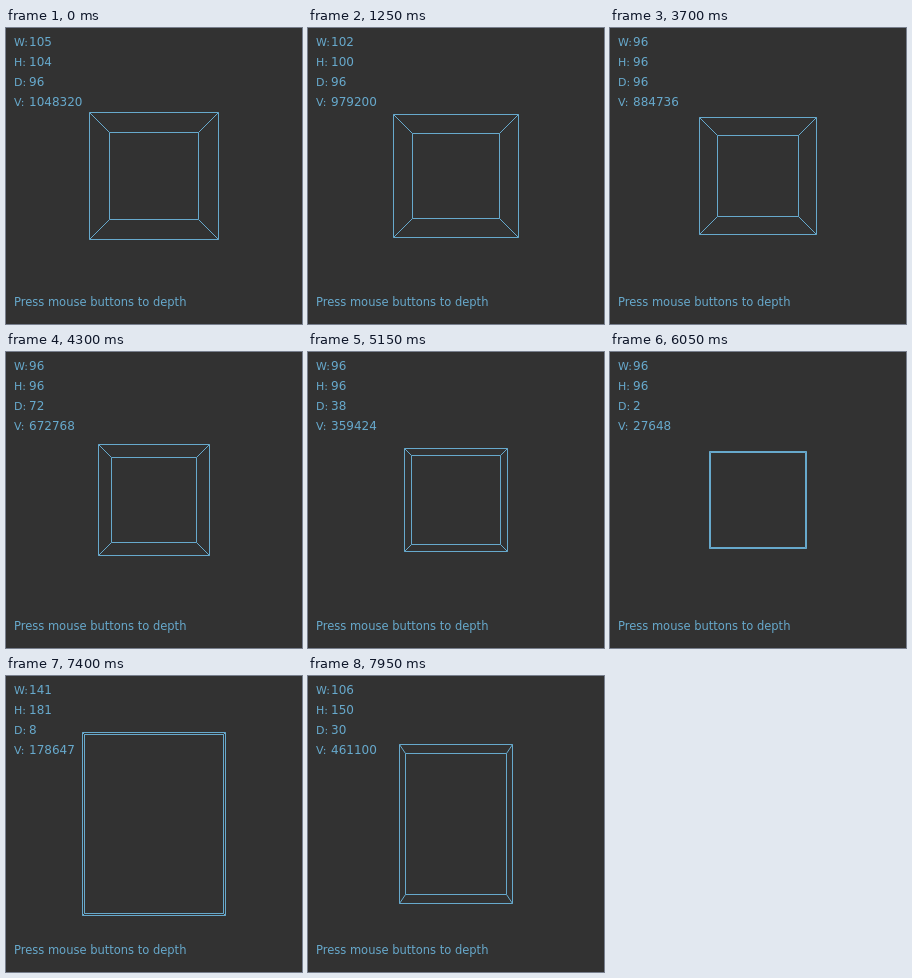
An HTML page with a canvas for the animation above (8 s loop, 296 px wide and 296 px high).

```html
<!DOCTYPE html>
<html lang="en">
<head>
<meta charset="utf-8">
<style>
html, body { margin: 0; width: 100%; height: 100%; overflow: hidden; background: #323232; }
canvas { display: block; }
</style>
</head>
<body>
<canvas id="stage" width="296" height="296"></canvas>
<script>
const ctx = document.getElementById('stage').getContext('2d');
const SIZE = 296, MID = SIZE / 2, LOOP = 8000, STEP = 50;
const EYE = 260;
const FONT = '"DejaVu Sans", sans-serif';

const clamp = (v, lo, hi) => Math.max(lo, Math.min(hi, v));
const ramp = (t, from, to) => clamp((t - from) / (to - from), 0, 1);
const pullBack = u => u * u * (3.5 * u - 2.5);

// The pointer trims the box to a cube, flings it wide, then swings round to a tall shape
function boxSize(t) {
  const trim = ramp(t, 850, 1750), settle = ramp(t, 2400, 2900);
  const fling = pullBack(ramp(t, 6200, 6900)), swing = ramp(t, 6900, 7700);
  const w = 105 - 7 * trim - 2 * settle + 104 * fling - 94 * swing;
  const h = 104 - 8 * trim + 49 * fling + 5 * swing + 36 * Math.sin(Math.PI * swing);
  return [Math.round(w), Math.round(h)];
}

// Depth changes by one every 25 ms while a button is held
function depthAt(t) {
  const d = t < 7200 ? 96 - (t - 3700) / 25 : (t - 7200) / 25;
  return clamp(Math.round(d), 0, 96);
}

function corners(w, h, z) {
  const s = EYE / (EYE - z) / 2;
  const at = v => Math.floor(MID + v * s) + 0.5;
  return [[at(-w), at(-h)], [at(w), at(-h)], [at(w), at(h)], [at(-w), at(h)]];
}

function drawBox(w, h, d) {
  const front = corners(w, h, d / 2), back = corners(w, h, -d / 2);
  ctx.beginPath();
  for (let i = 0; i < 4; i++) {
    const j = (i + 1) % 4;
    for (const [a, b] of [[front[i], front[j]], [back[i], back[j]], [front[i], back[i]]]) {
      ctx.moveTo(...a);
      ctx.lineTo(...b);
    }
  }
  ctx.stroke();
}

function text(str, x, y, px = 11.5) {
  ctx.font = `${px}px ${FONT}`;
  ctx.fillText(str, x, y);
}

function row(label, value, y) {
  text(label + ':', 8, y, 11);
  text(value, 23, y, 12);
}

function draw(t) {
  const [w, h] = boxSize(t);
  const d = depthAt(t);
  ctx.fillStyle = '#323232';
  ctx.fillRect(0, 0, SIZE, SIZE);
  ctx.fillStyle = ctx.strokeStyle = d ? '#67a9cc' : '#e2488a';
  drawBox(w, h, d);
  row('W', w, 18);
  row('H', h, 38);
  row('D', d, 58);
  // The volume readout trails the depth by one tick
  if (d) row('V', w * h * depthAt(t - 25), 78);
  else text('No volume', 8, 78);
  text('Press mouse buttons to depth', 8, 278);
}

const start = performance.now();
function frame(now) {
  const t = Math.max(0, now - start) % LOOP;
  draw(Math.floor(t / STEP) * STEP);
  requestAnimationFrame(frame);
}
frame(start);
</script>
</body>
</html>
```
